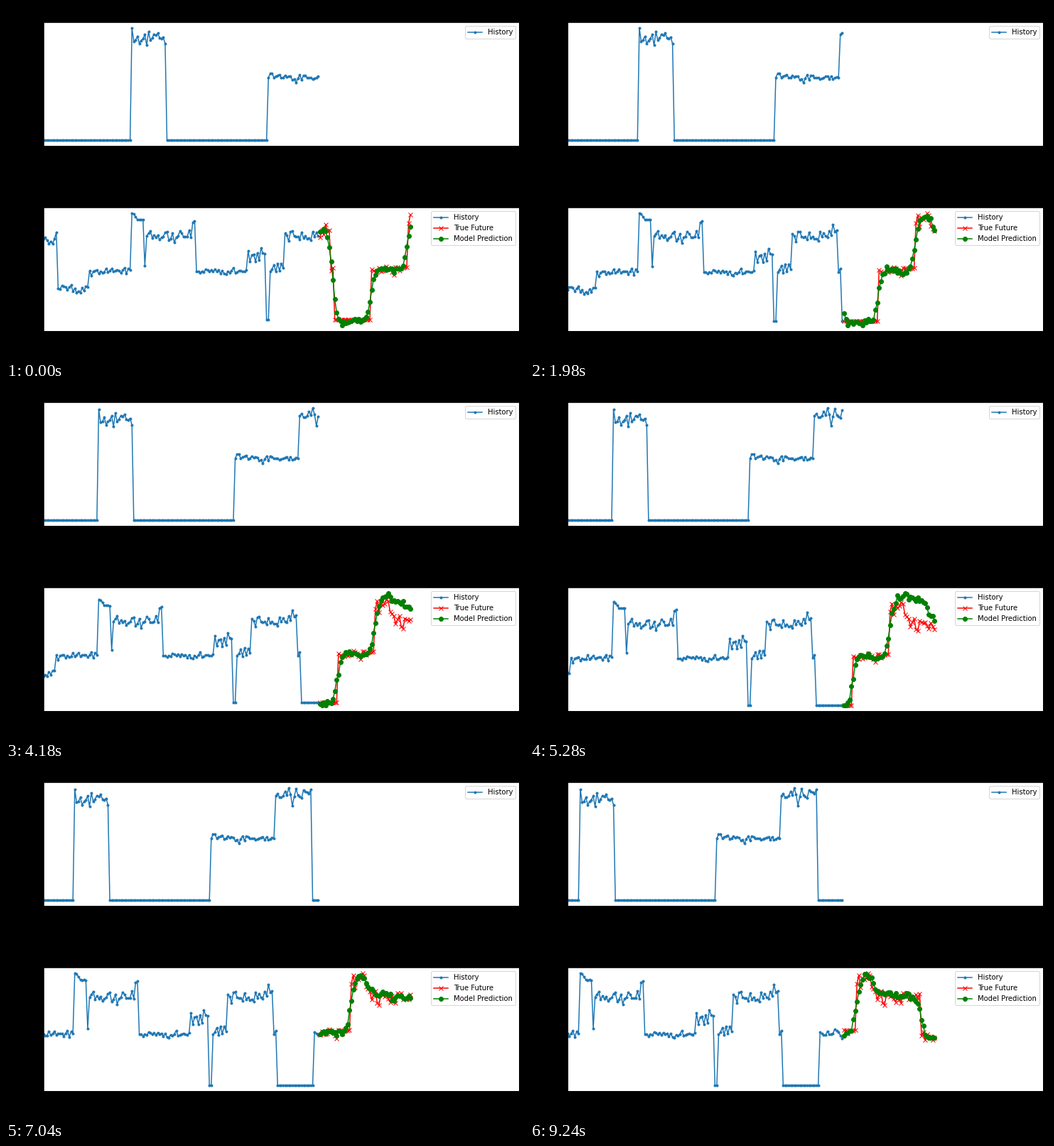
Animation, 729 px wide and 496 px high, one loop 9.46 s. Source, as a matplotlib script:

```python
import numpy as np
import matplotlib.pyplot as plt
from matplotlib.animation import FuncAnimation

W, H, DPI = 729, 496, 72
PAST, AHEAD = 150, 50
FRAMES, INTERVAL = 43, 220
HOLD = 16  # the window rests for one tick here


def signal(seed, segments):
    """Join noisy plateaus given as (samples, lowest, highest)."""
    rng = np.random.default_rng(seed)
    parts = []
    for n, lo, hi in segments:
        noise = rng.normal(size=n)
        noise = (noise - noise.min()) / max(np.ptp(noise), 1e-9)
        parts.append(lo + (hi - lo) * noise)
    return np.concatenate(parts)


def smooth(data, sigma):
    reach = int(4 * sigma)
    kernel = np.exp(-0.5 * (np.arange(-reach, reach + 1) / sigma) ** 2)
    padded = np.pad(data, reach, mode="edge")
    return np.convolve(padded, kernel / kernel.sum(), mode="valid")


load = signal(4, [(48, 0, 0), (19, 132, 156), (55, 0, 0), (35, 80, 93),
                  (20, 133, 158), (14, 0, 0)])

power = signal(7, [(8, 112, 129), (17, 40, 51), (23, 65, 77), (7, 147, 149),
                   (1, 80, 80), (25, 114, 132), (2, 144, 146), (28, 67, 77),
                   (10, 86, 106), (2, 0, 0), (8, 71, 83), (19, 116, 131),
                   (6, 122, 141), (2, 72, 77), (20, 0, 0), (20, 66, 79),
                   (10, 135, 157), (25, 113, 132), (8, 64, 75)])
power[48:52] += 10 - 3 * np.arange(4)  # sharp onset that settles

near, wide = smooth(power, 1.9), smooth(power, 6)
model = near + 0.15 * (near - wide)


def predict(step):
    """Smoothed future, jitter, and a late drop that is seen too late."""
    t = step + PAST + np.arange(AHEAD)
    miss = np.interp(step, [0, 9, 18, 27, 31], [0, 4, 30, 50, 6])
    jitter = np.random.default_rng(step).normal(0, 2.3, AHEAD)
    return model[t] + miss * np.exp(-((t - 212) / 8) ** 2) + jitter


def add_axes(top):
    left, width, height = 52.65, 669.6, 173.95
    ax = fig.add_axes([left / W, 1 - (top + height) / H, width / W, height / H])
    ax.set_xlim(-PAST, 108)
    ax.set_xticks([])
    ax.set_yticks([])
    return ax


def fit(ax, *data):
    lo = min(d.min() for d in data)
    hi = max(d.max() for d in data)
    pad = 0.05 * (hi - lo)
    ax.set_ylim(lo - pad, hi + pad)


plt.rcParams["font.family"] = "DejaVu Sans"
fig = plt.figure(figsize=(W / DPI, H / DPI), dpi=DPI, facecolor="black")
upper, lower = add_axes(23.2), add_axes(284.1)

past_x, ahead_x = np.arange(-PAST, 0), np.arange(AHEAD)
load_line, = upper.plot(past_x, load[:PAST], ".-", color="C0", label="History")
past_line, = lower.plot(past_x, power[:PAST], ".-", color="C0", label="History")
true_line, = lower.plot(ahead_x, np.zeros(AHEAD), "rx-", label="True Future")
pred_line, = lower.plot(ahead_x, np.zeros(AHEAD), "go-", label="Model Prediction")
for ax in (upper, lower):
    ax.legend(loc="upper right", fontsize=10)


def update(frame):
    step = frame - (frame >= HOLD)
    end = step + PAST
    used, past = load[step:end], power[step:end]
    true, pred = power[end:end + AHEAD], predict(step)
    load_line.set_ydata(used)
    past_line.set_ydata(past)
    true_line.set_ydata(true)
    pred_line.set_ydata(pred)
    fit(upper, used)
    fit(lower, past, true, pred)
    return load_line, past_line, true_line, pred_line


anim = FuncAnimation(fig, update, frames=FRAMES, interval=INTERVAL,
                     init_func=lambda: update(0), repeat=True, repeat_delay=0)
plt.show()
```
